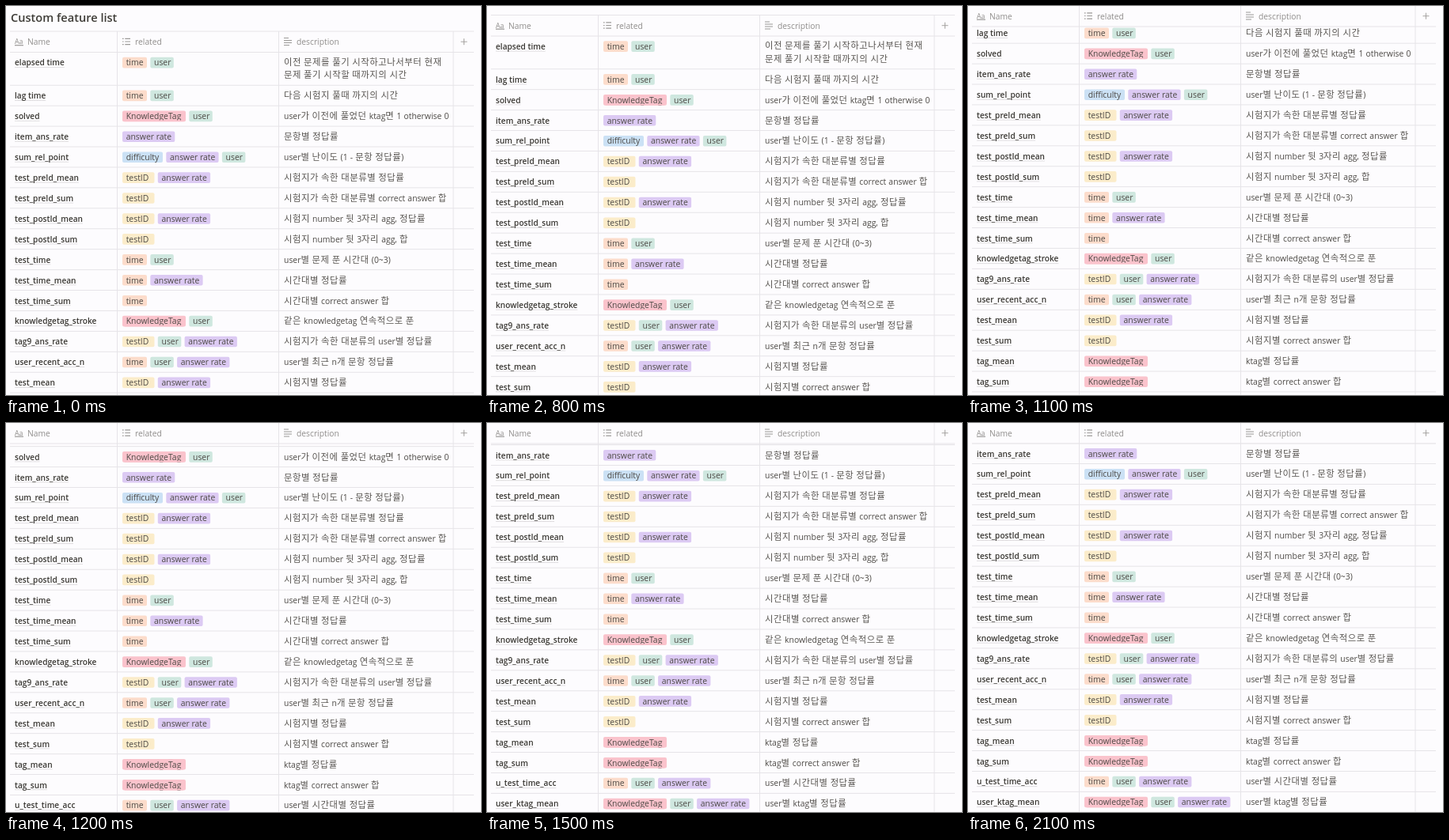
Write an HTML page that moves like this. It is 600x492 px and loops after 2.2 s.

```html
<!DOCTYPE html>
<html lang="ko">
<head>
<meta charset="utf-8">
<title>Custom feature list</title>
<style>
  html, body { margin: 0; width: 100%; height: 100%; overflow: hidden; background: #fdfcfe; }
  svg { display: block; }
  text { font: 10.4px "Open Sans", "Noto Sans", sans-serif; fill: #4c4945; white-space: pre; }
  .title { font-size: 14.6px; font-weight: 600; fill: #3d3b36; }
  .name { font-size: 10.15px; font-weight: 600; fill: #3a3833; }
  .head { font-size: 10.3px; fill: #8f8d8b; }
  .desc { word-spacing: .4px; }
  .hangul { font: 11.4px "Noto Sans CJK KR", "Noto Sans CJK", "Noto Sans KR", sans-serif; letter-spacing: .52px; fill: #5a5753; }
  .rule { stroke: #e6e4e8; stroke-width: 1; }
  .underline { stroke: #dddbdd; stroke-width: .9; }
  .icon { stroke: #9a9896; stroke-width: 1.2; fill: none; }
  .plus { stroke: #a5a3a1; stroke-width: 1; }
</style>
</head>
<body>
<svg id="stage" width="600" height="492" viewBox="0 0 600 492"></svg>
<script>
const LOOP = 2200, STEP = 100, SCROLL_START = 600;
const SCROLL = [1, 5.5, 20.5, 38.5, 58.5, 79, 96.5, 111.2, 119.5, 124.5, 126, 126.5];
const LEFT = 5, RIGHT = 591, HEAD_TOP = 32, HEAD_HEIGHT = 26;
const FIRST_ROW = 71.4, SECOND_ROW = 113.2, PITCH = 25.93, BASELINE = 4;

const TAGS = {
  t: ["time", 31, "#fcdccb"],
  u: ["user", 29.5, "#cfe7df"],
  k: ["KnowledgeTag", 80, "#fac3cc"],
  a: ["answer rate", 66.3, "#dccaf3"],
  d: ["difficulty", 51, "#cbe1f5"],
  i: ["testID", 40.5, "#fbecca"]
};

const ROWS = [
  ["elapsed time", "tu", "이전 문제를 풀기 시작하고나서부터 현재", "문제 풀기 시작할 때까지의 시간"],
  ["lag time", "tu", "다음 시험지 풀때 까지의 시간"],
  ["solved", "ku", "user가 이전에 풀었던 ktag면 1 otherwise 0"],
  ["item_ans_rate", "a", "문항별 정답률"],
  ["sum_rel_point", "dau", "user별 난이도 (1 - 문항 정답률)"],
  ["test_preId_mean", "ia", "시험지가 속한 대분류별 정답률"],
  ["test_preId_sum", "i", "시험지가 속한 대분류별 correct answer 합"],
  ["test_postId_mean", "ia", "시험지 number 뒷 3자리 agg, 정답률"],
  ["test_postId_sum", "i", "시험지 number 뒷 3자리 agg, 합"],
  ["test_time", "tu", "user별 문제 푼 시간대 (0~3)"],
  ["test_time_mean", "ta", "시간대별 정답률"],
  ["test_time_sum", "t", "시간대별 correct answer 합"],
  ["knowledgetag_stroke", "ku", "같은 knowledgetag 연속적으로 푼"],
  ["tag9_ans_rate", "iua", "시험지가 속한 대분류의 user별 정답률"],
  ["user_recent_acc_n", "tua", "user별 최근 n개 문항 정답률"],
  ["test_mean", "ia", "시험지별 정답률"],
  ["test_sum", "i", "시험지별 correct answer 합"],
  ["tag_mean", "k", "ktag별 정답률"],
  ["tag_sum", "k", "ktag별 correct answer 합"],
  ["u_test_time_acc", "tua", "user별 시간대별 정답률"],
  ["user_ktag_mean", "kua", "user별 ktag별 정답률"]
];

const stage = document.getElementById("stage");

function add(parent, tag, attrs = {}, content = "") {
  const node = document.createElementNS("http://www.w3.org/2000/svg", tag);
  for (const key in attrs) node.setAttribute(key, attrs[key]);
  node.textContent = content;
  return parent.appendChild(node);
}

const label = (parent, x, y, cls, content) => add(parent, "text", { x, y, class: cls }, content);
const rule = (parent, x1, y1, x2, y2, cls = "rule") => add(parent, "line", { x1, y1, x2, y2, class: cls });

// Hangul and Latin runs use different faces and sizes.
function mixedLabel(parent, x, y, content) {
  const text = label(parent, x, y, "desc", "");
  for (const run of content.match(/[가-힣]+|[^가-힣]+/g)) {
    add(text, "tspan", /[가-힣]/.test(run) ? { class: "hangul" } : {}, run);
  }
}

function drawTags(parent, keys, center) {
  let x = 147;
  for (const key of keys) {
    const [content, width, fill] = TAGS[key];
    add(parent, "rect", { x, y: center - 6.6, width, height: 13.6, rx: 2, fill });
    label(parent, x + 4.7, center + BASELINE, "tag", content);
    // The long tag cuts off its descenders.
    if (key === "k") add(parent, "rect", { x: x + 3, y: center + 5.3, width: width - 6, height: 1.7, fill });
    x += width + 4.3;
  }
}

function drawRow(parent, [name, tags, ...lines], index) {
  const center = index ? SECOND_ROW + (index - 1) * PITCH : FIRST_ROW;
  const bottom = SECOND_ROW + (index - .5) * PITCH;
  const base = center + BASELINE;
  const text = label(parent, 11, base, "name", name);
  const end = 11 + text.getComputedTextLength();
  parent.insertBefore(rule(parent, 11, base + 2.2, end, base + 2.2, "underline"), text);
  drawTags(parent, tags, center);
  lines.forEach((line, i) => mixedLabel(parent, 351, base + i * 16.3 - (lines.length > 1 ? .6 : 0), line));
  rule(parent, LEFT, bottom, RIGHT, bottom);
}

function drawHeader(parent) {
  add(parent, "rect", { x: 0, y: 0, width: 600, height: HEAD_HEIGHT, fill: "#fdfcfe" });
  rule(parent, LEFT, 0, RIGHT, 0);
  rule(parent, LEFT, HEAD_HEIGHT + .5, RIGHT, HEAD_HEIGHT + .5);
  for (const x of [140.5, 344.5, 565]) rule(parent, x, 0, x, 492);

  label(parent, 11, 16, "head", "Aa").style.fontSize = "8.8px";
  add(parent, "path", { class: "icon", d: "M11 17.7H22" });
  add(parent, "path", { class: "icon", d: "M147 9.3h1.6m1.7 0h6.7M147 13h1.6m1.7 0h6.7M147 16.7h1.6m1.7 0h6.7" });
  add(parent, "path", { class: "icon", d: "M351 8.5h6M351 11.5h10M351 14.5h10M351 17.5h7" });
  add(parent, "path", { class: "icon plus", d: "M574.5 13.2h8M578.5 9.2v8" });
  label(parent, 27, 17.3, "head", "Name");
  label(parent, 163, 17.3, "head", "related");
  label(parent, 367, 17.3, "head", "description");
}

const body = add(stage, "g");
const header = add(stage, "g");
label(body, 6, 20.2, "title", "Custom feature list");
ROWS.forEach((row, index) => drawRow(body, row, index));
drawHeader(header);

function render(time) {
  const step = Math.floor((time % LOOP - SCROLL_START) / STEP);
  const scroll = step < 0 ? 0 : SCROLL[Math.min(step, SCROLL.length - 1)];
  body.setAttribute("transform", `translate(0 ${-scroll})`);
  header.setAttribute("transform", `translate(0 ${Math.max(HEAD_TOP - scroll, -.5)})`);
}

const start = performance.now();
function tick() {
  render(performance.now() - start);
  requestAnimationFrame(tick);
}
tick();
</script>
</body>
</html>
```
